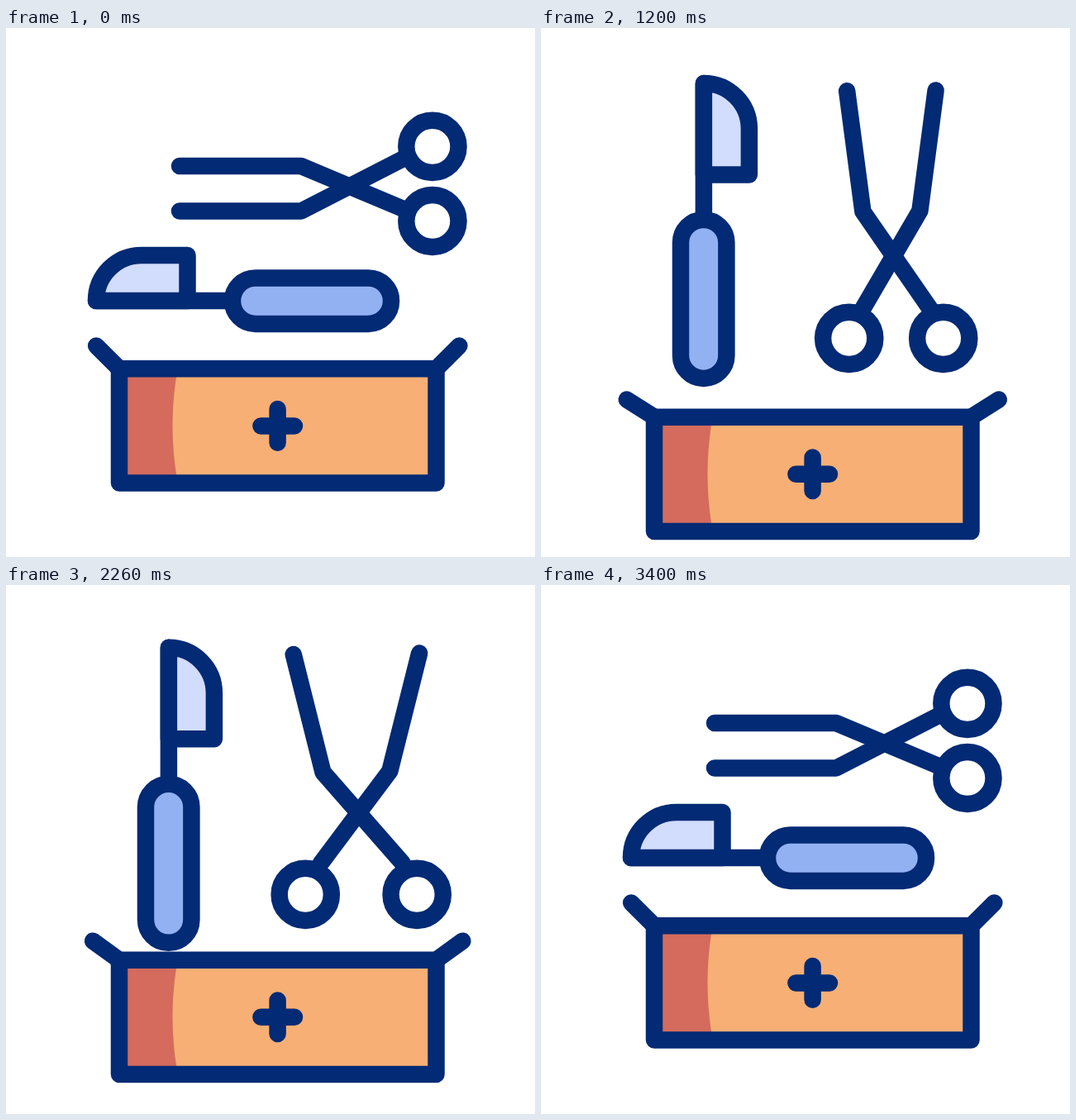
These frames come from a looping animation (640 by 640 pixels, 3.62 s). An HTML page with a canvas:

```html
<!DOCTYPE html>
<html lang="en">
<head>
<meta charset="utf-8">
<title>Surgical kit</title>
<style>
html, body { margin: 0; width: 100%; height: 100%; overflow: hidden; background: #fff; }
canvas { display: block; width: 100vw; height: 100vh; }
</style>
</head>
<body>
<canvas id="stage" width="640" height="640"></canvas>
<script>
const ctx = document.getElementById('stage').getContext('2d');
const LOOP = 3620, STEP = 20;
const NAVY = '#032a74', ORANGE = '#f7af75', RED = '#d46b5d', BLUE = '#92b1f3', PALE = '#d2dcfd';
const RAD = Math.PI / 180;

const smooth = u => u * u * (3 - 2 * u);
const mix = (a, b, p) => a + (b - a) * p;

// Eased value through evenly spaced keys, starting at 200 ms
function track(t, gap, ...keys) {
  const pos = Math.min(Math.max((t - 200) / gap, 0), keys.length - 1);
  const i = Math.min(Math.floor(pos), keys.length - 2);
  return mix(keys[i], keys[i + 1], smooth(pos - i));
}

function paint(path, fill) {
  if (fill) { ctx.fillStyle = fill; ctx.fill(path); }
  ctx.stroke(path);
}

// Runs draw in a frame turned by deg about (x, y)
function turned(x, y, deg, draw) {
  ctx.save();
  ctx.translate(x, y);
  ctx.rotate(deg * RAD);
  draw();
  ctx.restore();
}

const shapes = {
  blade: new Path2D('M-178.5 13.5H-68V-41.5H-123.5A55 55 0 0 0 -178.5 13.5Z'),
  neck: new Path2D('M-178.5 13.5H-13.5'),
  handle: new Path2D(),
  armA: new Path2D('M-204.5 -24.1H-57.5L71.5 30'),
  armB: new Path2D('M-204.5 30.4H-57.5L72.2 -36.1'),
  flap: new Path2D('M0 0H39.4'),
  shade: new Path2D('M137 412H208L206 422Q197 481 206 540L208 550H137Z'),
  cross: new Path2D('M308.4 481.4H349M328.6 461.1V501.7'),
  box: new Path2D('M137 412.3H520.5V550.5H137Z')
};
shapes.handle.roundRect(-13.5, -14, 192, 55.4, 27.7);

function scalpel(turn, dip) {
  turned(mix(287.5, 210.4, turn), mix(316.5, 239.4, turn) + dip, 90 * turn, () => {
    paint(shapes.neck);
    paint(shapes.blade, PALE);
    paint(shapes.handle, BLUE);
  });
}

function ring(x, y) {
  const p = new Path2D();
  p.arc(x, y, 31.6, 0, 2 * Math.PI);
  paint(p, '#fff');
}

function scissors(turn, open) {
  turned(mix(378.8, 429.8, turn), mix(188.3, 239.3, turn), 90 * turn, () => {
    ctx.translate(35.7, 2.8);
    turned(0, 0, 15 * open, () => paint(shapes.armA));
    turned(0, 0, -15 * open, () => paint(shapes.armB));
    const x = 101.4 - 2.1 * open, spread = 23.8 * open;
    ring(x, 42.4 + spread);
    ring(x, -47.8 - spread);
  });
}

function box(drop, fold) {
  ctx.save();
  ctx.translate(0, drop);
  turned(137, 412.3, 225 - fold, () => paint(shapes.flap));
  turned(520.5, 412.3, fold - 45, () => paint(shapes.flap));
  ctx.fillStyle = ORANGE;
  ctx.fill(shapes.box);
  ctx.fillStyle = RED;
  ctx.fill(shapes.shade);
  paint(shapes.box);
  paint(shapes.cross);
  ctx.restore();
}

function render(t) {
  ctx.fillStyle = '#fff';
  ctx.fillRect(0, 0, 640, 640);
  ctx.strokeStyle = NAVY;
  ctx.lineWidth = 20.5;
  ctx.lineCap = ctx.lineJoin = 'round';

  const turn = track(t, 800, 0, 1, 1, 1, 0);
  const dip = track(t, 800, 0, 0, 38.4, 0, 0);
  const open = track(t, 400, 0, 0, 0, 1, 0, 1, 0, 0, 0);
  const drop = track(t, 800, 0, 64.4, 26, 51.2, 0);
  const fold = track(t, 800, 0, 15, 0, 15, 0);

  scalpel(turn, dip);
  scissors(turn, open);
  box(drop, fold);
}

const start = performance.now();
function tick() {
  const t = (performance.now() - start) % LOOP;
  render(Math.floor(t / STEP) * STEP);
  requestAnimationFrame(tick);
}
tick();
</script>
</body>
</html>
```
